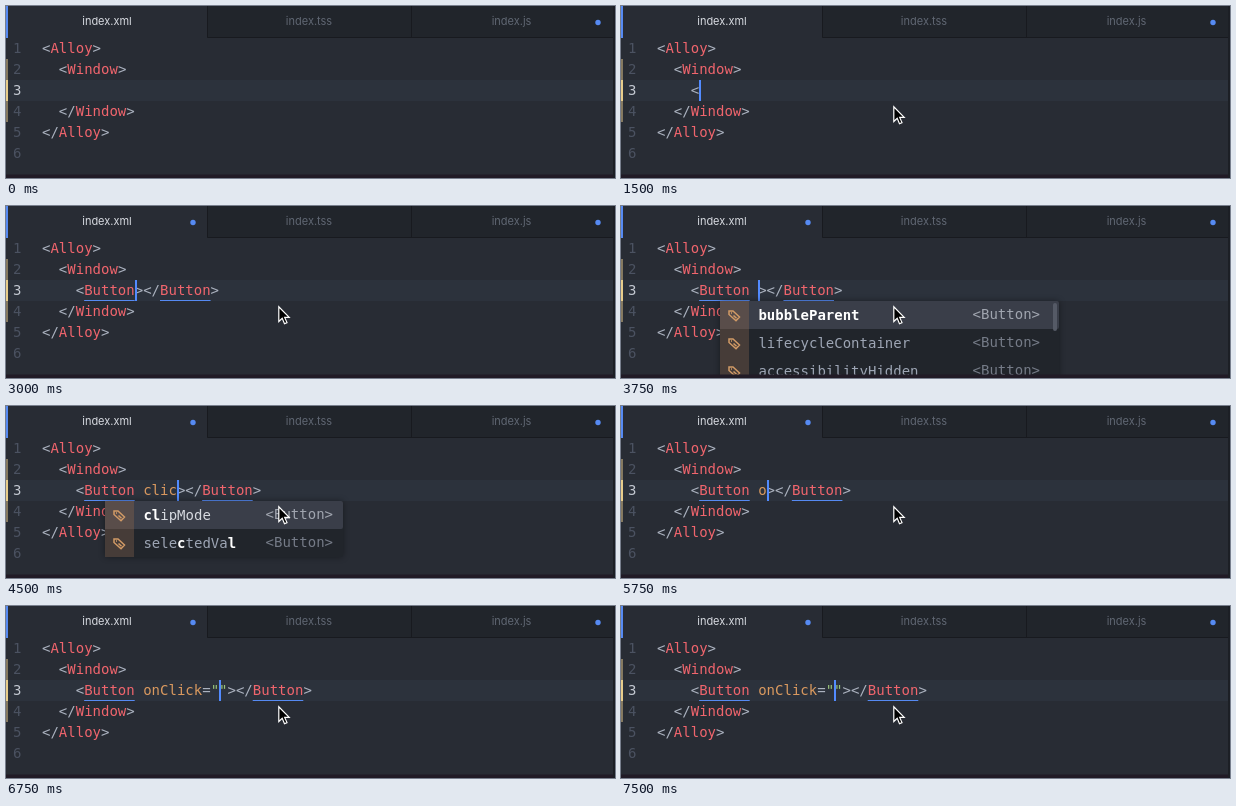
Write an HTML page that moves like this. It is 609x172 px and loops after 8 s.

```html
<!DOCTYPE html>
<html lang="en">
<head>
<meta charset="utf-8">
<style>
  html, body { margin: 0; height: 100%; overflow: hidden; background: #282c34; }
  svg { display: block; }
  text { font: 14px "DejaVu Sans Mono", monospace; white-space: pre; fill: #abb2bf; }
  .tab { font: 11px Inter, sans-serif; text-anchor: middle; fill: #606773; }
  .tab.active { fill: #d7dae0; }
  .num { fill: #4b5261; }
  .num.active { fill: #c4c9d2; }
  .tag { fill: #f0656d; }
  .attr { fill: #d9995f; }
  .str { fill: #98c379; }
  .blue { fill: #568af2; }
  .item { fill: #9da5b4; }
  .item.active { fill: #d7dae0; }
  .item .match { fill: #fff; font-weight: bold; }
  .hint { fill: #757b87; text-anchor: end; }
  .hint.active { fill: #a0a5af; }
  .icon { fill: none; stroke-width: 1.5; }
  .shadow { filter: drop-shadow(0 0 3px #0006); }
</style>
</head>
<body>
<svg width="609" height="172" viewBox="0 0 609 172">
  <rect width="609" height="172" fill="#282c34"/>
  <rect x="201" width="408" height="32" fill="#21252b"/>
  <path d="M201.5 0V31.5H609M405.5 0V32" fill="none" stroke="#181a1f"/>
  <rect class="blue" width="2" height="32"/>
  <text class="tab active" x="101" y="19">index.xml</text>
  <text class="tab" x="303" y="19">index.tss</text>
  <text class="tab" x="505.500" y="19">index.js</text>
  <circle class="blue" id="modified" cx="187" cy="16.500" r="2.700"/>
  <circle class="blue" cx="592" cy="16.500" r="2.700"/>
  <rect y="74" width="609" height="21" fill="#2c323c"/>
  <path d="M0 53h2v63h-2z" fill="#857960"/>
  <path d="M0 74h2v21h-2z" fill="#e8cd8b"/>
  <g id="code"></g>
  <g id="popup"></g>
  <path d="M0 168.500h609v3.500H0z" fill="#211b26"/>
  <path d="M607 0h2v172h-2z" fill="#1c1f25"/>
  <path id="mouse" d="M.8 .8V15.500L4.200 12.300 6.500 17.700 9 16.600 6.700 11.400H11.200Z" fill="#000" stroke="#fff" stroke-width="1.200"/>
</svg>
<script>
const LOOP = 8000, CHAR = 8.428, LEFT = 36, ROW = 21, ITEM = 28;
const $ = id => document.getElementById(id);
const escape = s => s.replace(/</g, "&lt;");
const span = (cls, s) => `<tspan class="${cls}">${escape(s)}</tspan>`;
const text = (cls, x, y, body) => `<text class="${cls}" x="${x}" y="${y}">${body}</text>`;
const rect = (x, y, w, h, fill, more = "") =>
  `<rect x="${x}" y="${y}" width="${w}" height="${h}" fill="${fill}" ${more}/>`;

const kinds = {
  tag: { color: "#e8636b", cell: "#4a323a", active: "#58404a", icon: "M-1.500-3.500-5 0-1.500 3.500M1.500-3.500 5 0 1.500 3.500" },
  prop: { color: "#d19a66", cell: "#463c38", active: "#594d4a",
    icon: "M-5.500-4.500H-1.500L5 1.500 1.500 5.200-5.500-1ZM-3.500-2.500h1M-1 0 2 2.800" },
  event: { color: "#56a8f0", cell: "#2b3b4d", active: "#3c4d61", icon: "M1.500-5-3 1H0L-1.500 5 3-1H0Z" }
};
const menu = (kind, x, right, items, scroll = 0) => ({ kind, x, right, items, scroll });
// Square brackets mark the matched letters.
const tags = (...items) => menu("tag", 40, 242, items);
const props = menu("prop", 99, 438, ["[bubbleParent]", "lifecycleContainer", "accessibilityHidden"], 1);
const clips = menu("prop", 99, 337, ["[cl]ipMode", "sele[c]tedVa[l]"]);
const events = menu("event", 99, 438, ["[on]Click", "onDblclick", "onLongclick"], 1);
const clicks = menu("event", 99, 328, ["[onC]lick", "onDbl[c]lick", "onLong[c]lick"]);

// time, text before the caret, text after it, caret shown, menu
const END = "></Button>";
const steps = [
  [0, "", "", 0],
  [1000, "", "", 1],
  [1250, "", "", 0],
  [1500, "<", "", 1],
  [2000, "<B", "", 1, tags("[B]utton", "[B]uttonBar", "[B]arItemStyle")],
  [2250, "<Bt", "", 1, tags("[B]u[t]ton", "[B]u[t]tonBar", "[B]arI[t]emStyle")],
  [2500, "<Btn", "", 1, tags("[B]u[t]to[n]", "[B]u[t]to[n]Bar", "[B]u[t]to[n]Name")],
  [3000, "<Button", END, 1],
  [3500, "<Button ", END, 1],
  [3750, "<Button ", END, 1, props],
  [4000, "<Button ", END, 0, props],
  [4250, "<Button c", END, 1, props],
  [4500, "<Button clic", END, 1, clips],
  [4750, "<Button clic", END, 1],
  [5000, "<Button clic", END, 0],
  [5250, "<Button cl", END, 1],
  [5500, "<Button c", END, 1],
  [5750, "<Button o", END, 1],
  [6000, "<Button on", END, 1, events],
  [6250, "<Button onc", END, 1, clicks],
  [6750, '<Button onClick="', '"' + END, 1],
  [7250, '<Button onClick="', '"' + END, 0],
  [7500, '<Button onClick="', '"' + END, 1]
];

function colorize(line) {
  let last = "";
  return line.match(/<\/?|\w+|"|[^<\w"]+/g)?.map(token => {
    const cls = token === '"' ? "str" : !/\w/.test(token) ? "" : last[0] === "<" ? "tag" : "attr";
    last = token;
    return span(cls, token);
  }).join("") ?? "";
}

function drawCode(before, after, caret) {
  const typed = before + after, top = 32 + 2 * ROW, start = LEFT + 4 * CHAR;
  const lines = ["<Alloy>", "  <Window>", "    " + typed, "  </Window>", "</Alloy>", ""];
  let out = lines.map((line, i) => {
    const y = 47 + i * ROW;
    return text(i === 2 ? "num active" : "num", 7, y, i + 1) + text("", LEFT, y, colorize(line));
  }).join("");
  if (after) {
    for (const at of [1, typed.indexOf("</") + 2])
      out += rect(start + at * CHAR, top + 20, 6 * CHAR, 1, "#568af2");
  }
  if (caret) out += rect(Math.round(start + before.length * CHAR), top, 2, ROW, "#528bff");
  return out;
}

function drawMenu({ kind, x, right, items, scroll }) {
  const { color, cell, active, icon } = kinds[kind], top = 95, width = right - x;
  let out = rect(x, top, width, items.length * ITEM, "#21252b", 'rx="2" class="shadow"');
  items.forEach((name, i) => {
    const y = top + i * ITEM, on = i ? "" : " active";
    if (!i) out += rect(x, y, width, ITEM, "#3a3e49", 'rx="2"');
    out += rect(x, y, ITEM + 1, ITEM, i ? cell : active);
    out += `<path class="icon" d="${icon}" stroke="${color}" transform="translate(${x + 14.5} ${y + 14.5})"`
      + (kind === "event" ? ` style="fill:${color};stroke-width:.5"/>` : "/>");
    out += text("item" + on, x + 38.4, y + 19, name.replace(/\[(.+?)\]/g, (_, m) => span("match", m)));
    if (kind !== "tag") out += text("hint" + on, right - (scroll ? 19 : 10), y + 18, escape("<Button>"));
  });
  if (scroll) out += rect(right - 6, top + 2, 4, 28, "#555a66", 'rx="2"');
  return out;
}

let shown;
function frame(now) {
  const t = now % LOOP;
  const step = steps.findLast(s => s[0] <= t);
  if (step !== shown) {
    const [, before, after, caret, list] = shown = step;
    $("code").innerHTML = drawCode(before, after, caret);
    $("popup").innerHTML = list ? drawMenu(list) : "";
  }
  $("modified").style.display = t < 2250 ? "none" : "";
  $("mouse").style.display = t < 500 ? "none" : "";
  $("mouse").setAttribute("transform", t < 750 ? "translate(353 110)" : "translate(272 100)");
  requestAnimationFrame(frame);
}
const begin = performance.now();
requestAnimationFrame(function tick() {
  frame(0);
});
frame = (draw => () => draw(performance.now() - begin))(frame);
</script>
</body>
</html>
```
